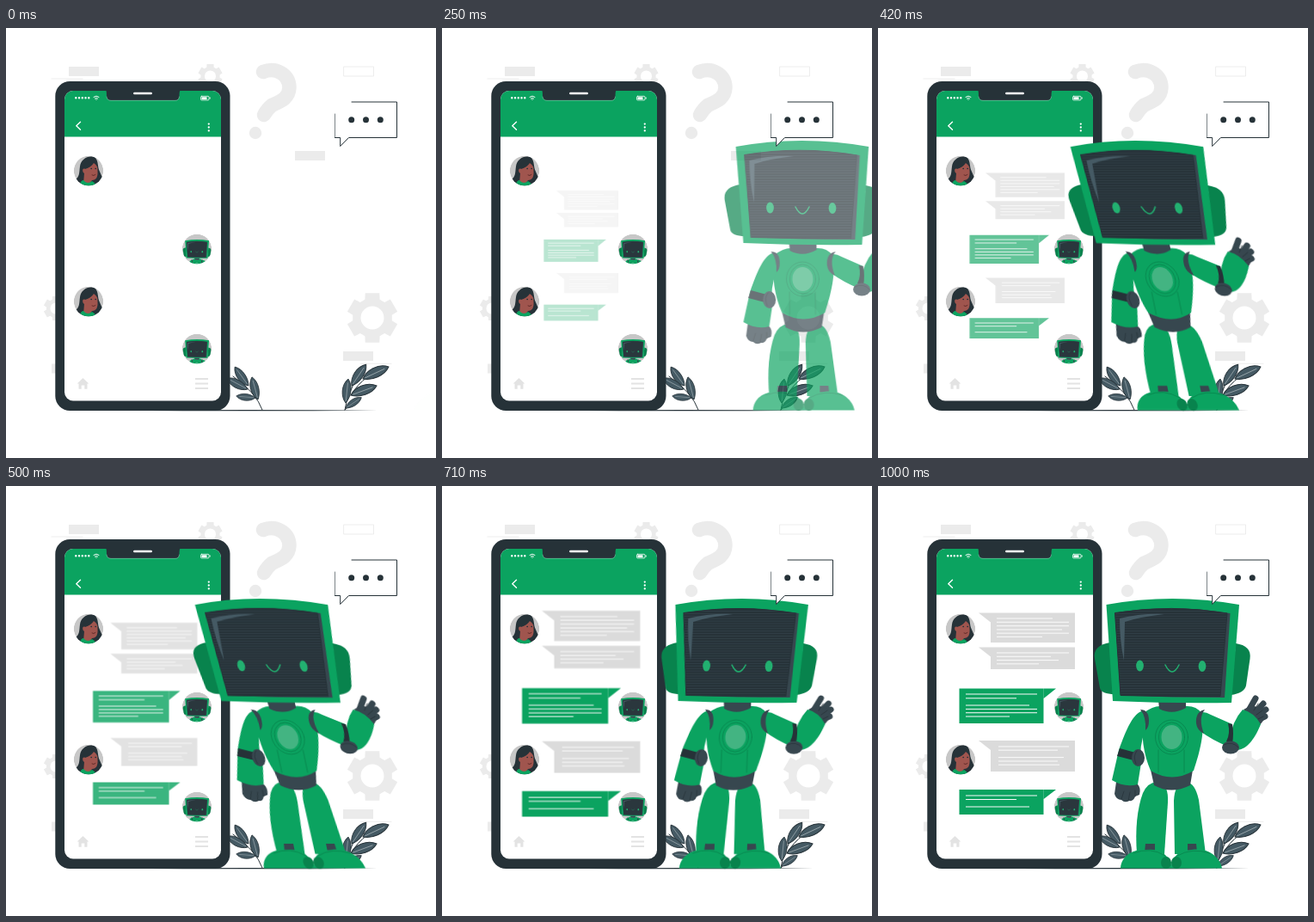
These frames come from a looping animation (500x500 px, 1040 ms). An HTML page:

```html
<!DOCTYPE html>
<html lang="en">
<head>
<meta charset="utf-8">
<title>Chat robot</title>
<style>
html, body { margin: 0; width: 100%; height: 100%; overflow: hidden; background: #fff; }
svg { display: block; width: 100%; height: 100%; }
:root { --t: 33; }
.fly, .zoom {
  animation: 1s cubic-bezier(.36, -.01, .5, 1.38) calc(var(--t) * -1ms) both paused;
}
.fly { animation-name: fly; transform-origin: 341px 288px; }
.zoom { animation-name: zoom; transform-origin: 161.7px 264.6px; }
@keyframes fly {
  0% { transform: translateX(250px) skewX(-20deg); opacity: 0; }
  60% { transform: translateX(0) skewX(10deg); opacity: 1; }
  80% { transform: translateX(0) skewX(-2deg); opacity: 1; }
  100% { transform: translateX(0) skewX(0); opacity: 1; }
}
@keyframes zoom {
  0% { transform: scale(.5); opacity: 0; }
  100% { transform: scale(1); opacity: 1; }
}
.green { fill: #0ba360; }
.deep { fill: #08834d; }
.dark { fill: #263238; }
.slate { fill: #37474f; }
.pale { fill: #ebebeb; }
.line { fill: none; stroke-linecap: round; stroke-linejoin: round; }
.ink { stroke: #263238; }
.white { stroke: #fff; }
.seam { stroke: #08834d; stroke-width: .8; }
.grey { fill: #dbdbdb; }
.text { fill: none; stroke: #fafafa; stroke-width: 1; }
</style>
</head>
<body>
<svg viewBox="0 0 500 500">
<defs>
  <pattern id="scan" width="4" height="2.9" patternUnits="userSpaceOnUse">
    <rect width="4" height="2.9" fill="#263238"/>
    <rect width="4" height=".7" fill="#35444c"/>
  </pattern>
  <clipPath id="disc"><circle r="17.2"/></clipPath>
  <clipPath id="screen"><rect x="68" y="73" width="182" height="360.5" rx="10"/></clipPath>

  <path id="cog" fill-rule="evenodd"/>
  <g id="leaf">
    <path d="M0 0C6 -6 19 -7 26 0C19 6 7 5 0 0Z" fill="#455a64" stroke="#263238" stroke-width=".8"/>
    <path d="M2 0H22" stroke="#a3afb4" stroke-width=".6"/>
  </g>

  <g id="girl" clip-path="url(#disc)">
    <circle r="17.2" fill="#c7c7c7"/>
    <path class="dark" d="M-10 -5C-9 -14 1 -19 8 -15C12 -10 10 -5 13 1Q15 7 18 10L12 18H-14L-17 11C-10 8 -11 2 -10 -5Z"/>
    <path d="M-5 3C-8 1 -7 -4 -4 -2Q3 -4 6 -9Q11 -6 10.500 0C11 7 9 11 4 11L1 15H-6Z" fill="#a0554e"/>
    <path class="line ink" d="M3 -2.500H3.400M8 -2.500H8.400" stroke-width="1.400"/>
    <path class="line" d="M4 5Q6 6.500 8 4.500" stroke="#5d2826" stroke-width=".9"/>
    <path class="green" d="M-11 18C-9 11 -6 10 -5 12Q-1 16 4 12Q8 14 9 18Z"/>
  </g>

  <g id="bot">
    <!-- legs and feet -->
    <path class="green" d="M308 357Q315 342 328 345Q338 348 337 368L333 428H301C299 400 301 376 308 357Z"/>
    <path class="green" d="M344 366Q345 345 357 345Q368 343 373 365L381 428H345Z"/>
    <path class="slate" d="M311 416H322V426H310ZM360 416H370L371 426H360Z"/>
    <path class="green" d="M282 444.500C283 430 296 422 311 423Q329 421 336 431Q342 437 341 444.500Z"/>
    <path class="green" d="M341 444.500C341 429 352 424 365 423C384 420 398 432 400 444.500Z"/>
    <path class="line seam" d="M297 427Q317 419 334 430M348 430Q365 420 386 427"/>
    <ellipse class="deep" cx="335" cy="438" rx="6" ry="7"/>
    <ellipse class="deep" cx="347" cy="438" rx="6" ry="7"/>
    <!-- body -->
    <path class="slate" d="M317 330Q342 342 366 330L363 348Q341 359 321 348Z"/>
    <path class="green" d="M309 264Q319 256 328 256Q342 266 357 256Q370 255 376 264C381 285 374 310 367 331Q342 346 317 331C309 312 305 290 309 264Z"/>
    <path class="slate" d="M326 249H358V258Q342 267 327 259Z"/>
    <path class="line seam" d="M326 307V333M356 307V333"/>
    <ellipse class="line seam" cx="341.500" cy="292" rx="19" ry="20"/>
    <ellipse class="line seam" cx="341.500" cy="292" rx="15" ry="17"/>
    <ellipse cx="341.500" cy="292" rx="12" ry="14" fill="#43b482"/>
    <!-- lowered arm -->
    <path class="slate" d="M277 344L275 358Q277 365 283 365Q287 369 292 366Q297 367 299 361L304 359Q306 351 302 347Z"/>
    <path class="line ink" d="M283 364L286 355M291 366L293 356M299 361L299 354" stroke-width=".7"/>
    <path class="green" d="M309 261C296 264 289 283 280 307L272 342Q287 351 302 347L306 322Q303 304 311 283Z"/>
    <path class="dark" d="M281 305L303 311L301 320L278 314Z"/>
    <ellipse class="slate" cx="302.500" cy="316" rx="7.500" ry="10"/>
    <path class="line ink" d="M301 308Q296 314 300 323" stroke-width=".7"/>
    <path class="slate" d="M305 260Q315 260 315 273Q315 281 311 284Q312 268 305 260Z"/>
    <!-- waving arm -->
    <path class="green" d="M373 264Q379 261 387 266L412 277L407 303Q388 295 376 286Z"/>
    <path class="slate" d="M380 260Q369 262 370 276Q371 284 379 288Q372 270 380 260Z"/>
    <g class="line" stroke="#37474f" stroke-width="7">
      <path d="M431 261L439 247M438 264L448 253M441 267L451 260M443 271L450 268"/>
    </g>
    <path class="slate" d="M425 260L434 255L448 259L451 269L444 278Z"/>
    <path class="line ink" d="M437 261L442 253M440 266L447 261M442 271L448 268" stroke-width=".8"/>
    <path class="green" d="M424 260Q437 263 445 277C440 290 430 307 417 307L408 297Q412 273 424 260Z"/>
    <path class="dark" d="M407 276L412 277Q414 288 412 299L405 297Q410 288 407 276Z"/>
    <ellipse class="slate" cx="410" cy="304" rx="10" ry="7.500"/>
    <path class="line ink" d="M402 301Q412 296 419 304" stroke-width=".7"/>
    <!-- head -->
    <path class="deep" d="M270 182C257 184 250 190 252 201L258 235Q260 242 275 242Z"/>
    <path class="deep" d="M416 183C428 185 434 190 432.500 201L428 232Q426 241 410 243Z"/>
    <path class="green" d="M265.500 138Q342 124 420 138L411 252Q342 253 273 250Z"/>
    <path class="slate" d="M275.500 147.500Q342 137 409.500 148L403 246Q342 246 282 243.500Z"/>
    <path d="M275.500 147.500Q342 137 406 148L398 244.500Q342 245 282 243.500Z" fill="url(#scan)" stroke="#263238"/>
    <path d="M281 154Q305 148 333 149Q305 152 287 158L286 203Q281 180 281 154Z" fill="#455a64"/>
    <g fill="#22b070">
      <ellipse cx="304.500" cy="209" rx="4.400" ry="6.500"/>
      <ellipse cx="377" cy="209.500" rx="4.400" ry="6.500"/>
    </g>
    <path class="line" d="M334 208Q342 224 350 208" stroke="#22b070" stroke-width="1.500"/>
  </g>
  <g id="botFace" clip-path="url(#disc)">
    <circle r="17.200" fill="#c7c7c7"/>
    <use href="#bot" transform="scale(.18) translate(-342 -192)"/>
  </g>
</defs>

<!-- backdrop -->
<g class="pale">
  <path d="M73 45h35v11h-35zM336 143h35v11h-35zM392 376h35v11h-35zM53 390.500h35v11h-35z"/>
  <use href="#cog" transform="translate(426 337)"/>
  <use href="#cog" transform="translate(237.500 56) scale(.485)"/>
  <use href="#cog" transform="translate(58 326) scale(.485)"/>
  <circle cx="290" cy="122" r="7.200"/>
</g>
<g class="line" stroke="#ebebeb">
  <path d="M299 51C314 45 329 54 329.500 69C329 83 317 86 309 90Q304 94 300 101" stroke-width="16.500"/>
  <path d="M53 59H89M412 390.300H448M393 45H427.500V56H393Z" stroke-width=".9"/>
</g>

<!-- ground and plants -->
<path class="dark" d="M130 444.700Q281 443.300 432 444.700Q281 445.800 130 444.700Z"/>
<path class="line ink" d="M298 444Q291 424 264 405M290 430L272 429M394 444Q397 425 408 408M401 427Q408 415 420 406M394 444L403 436" stroke-width="1"/>
<use href="#leaf" transform="translate(282 416) rotate(-126) scale(1.040)"/>
<use href="#leaf" transform="translate(293 432) rotate(-105) scale(1.040)"/>
<use href="#leaf" transform="translate(281 420) rotate(-152) scale(1.040)"/>
<use href="#leaf" transform="translate(290 430) rotate(-175) scale(.86)"/>
<use href="#leaf" transform="translate(395 436) rotate(-84) scale(1.080)"/>
<use href="#leaf" transform="translate(402 416) rotate(-56) scale(1.150)"/>
<use href="#leaf" transform="translate(415 408) rotate(-25) scale(1.270)"/>
<use href="#leaf" transform="translate(401 427) rotate(-20) scale(1.230)"/>
<use href="#leaf" transform="translate(395 442) rotate(-34) scale(.85)"/>

<!-- phone -->
<rect class="dark" x="57.300" y="62" width="203.200" height="383" rx="17"/>
<g clip-path="url(#screen)">
  <rect x="68" y="73" width="182" height="361" fill="#fff"/>
  <rect class="green" x="68" y="73" width="182" height="53.500"/>
</g>
<path class="dark" d="M116 72H203Q201.500 73 201.500 79Q201.500 84 197 84H122Q117 84 117 79Q117 73 116 72Z"/>
<path class="line white" d="M117 80Q117.500 84.300 122 84.300H197Q201 84.300 201.500 80" stroke-width=".5" opacity=".6"/>
<path class="line white" d="M149.300 76H168.700" stroke-width="2.500"/>
<path class="line white" d="M81.300 81.300H97" stroke-width="2.400" stroke-dasharray="0 3.750"/>
<path class="line white" d="M102 80.300Q105 77.800 108 80.300M103.500 82Q105 80.800 106.500 82M105 83.300V83.400" stroke-width="1"/>
<rect class="line white" x="226.500" y="79.300" width="9.500" height="4.600" rx="1" stroke-width=".8"/>
<path d="M227.500 80.300h6v2.600h-6zM236.600 80.600h1v2h-1z" fill="#fff"/>
<path class="line white" d="M86.500 109.300L81.800 113.700L86.500 118.200" stroke-width="1.400"/>
<path class="line white" d="M235.800 111.600V120" stroke-width="2.300" stroke-dasharray="0 3.900"/>
<path d="M89.500 407L96.300 413.500H94.500V419.700H91.300V415.500H87.700V419.700H84.500V413.500H82.700Z" fill="#e3e3e3"/>
<path d="M220 407h15v2h-15zM220 412.500h15v2h-15zM220 418h15v2h-15z" fill="#e3e3e3"/>
<use href="#girl" transform="translate(96 166)"/>
<use href="#girl" transform="translate(96 318)"/>
<use href="#botFace" transform="translate(222 257)"/>
<use href="#botFace" transform="translate(222 373)"/>

<!-- messages -->
<g class="zoom">
  <path class="grey" d="M117 147.500H229V182H131V158.500ZM117 187.500H229V213H131V198.500ZM117 296H229V332H131V307Z"/>
  <path class="green" d="M94.500 235.500H192.500V276H94.500ZM192.700 235.500H207L192.700 247ZM94.500 353H192.500V382H94.500ZM192.700 353H207L192.700 364Z"/>
  <path class="text" d="M138 154H203M138 158.300H222M138 162.700H222M138 167H214M138 171.200H222M138 175.400H191"/>
  <path class="text" d="M138 194H222M138 198.300H201M138 202.600H210M138 206.800H187"/>
  <path class="text" d="M140 303H222M140 307.200H209M140 315.600H216M140 320H209M140 324.200H211"/>
  <path class="text" d="M102 242H185M102 246.800H161M102 255H176M102 259.400H185M102 263.700H185M102 268H153"/>
  <path class="text" d="M102 360H185M102 364.500H161M102 373H176"/>
</g>

<g class="fly"><use href="#bot"/></g>

<!-- speech bubble -->
<path d="M382.500 86H454.500V127.500H398.500L388.700 137.500V127.500H382.500Z" fill="#fff"/>
<path class="line ink" d="M402 86H454.500V127.500H398.500L388.700 137.500V127.500H382.500" stroke-width="1"/>
<path class="line ink" d="M382.500 127.500V100" stroke-width=".6"/>
<g class="dark">
  <circle cx="401.700" cy="106.700" r="3.500"/>
  <circle cx="418.500" cy="106.700" r="3.500"/>
  <circle cx="435.300" cy="106.700" r="3.500"/>
</g>
</svg>
<script>
// Six-toothed cog with a round hole
function cogPath(outer, inner, hole) {
  const points = [];
  for (let i = 0; i < 6; i++) {
    for (const [r, turn] of [[inner, -22], [outer, -16], [outer, 16], [inner, 22]]) {
      const a = (i * 60 - 90 + turn) * Math.PI / 180;
      points.push((r * Math.cos(a)).toFixed(2) + " " + (r * Math.sin(a)).toFixed(2));
    }
  }
  return `M${points.join("L")}ZM${hole} 0A${hole} ${hole} 0 1 0 ${-hole} 0A${hole} ${hole} 0 1 0 ${hole} 0Z`;
}
document.getElementById("cog").setAttribute("d", cogPath(30, 23, 13.5));

// The motion runs in steps of 1/24 s; the first pose holds for two steps
const LOOP = 1040, FPS = 24, LEAD = 33;
const start = performance.now();

function tick() {
  const t = (performance.now() - start) % LOOP;
  const step = Math.floor((t - t % 10 + 4.9) * FPS / 1000);
  const time = (step < 2 ? 0 : step * 1000 / FPS) + LEAD;
  document.documentElement.style.setProperty("--t", time);
  requestAnimationFrame(tick);
}
tick();
</script>
</body>
</html>
```
